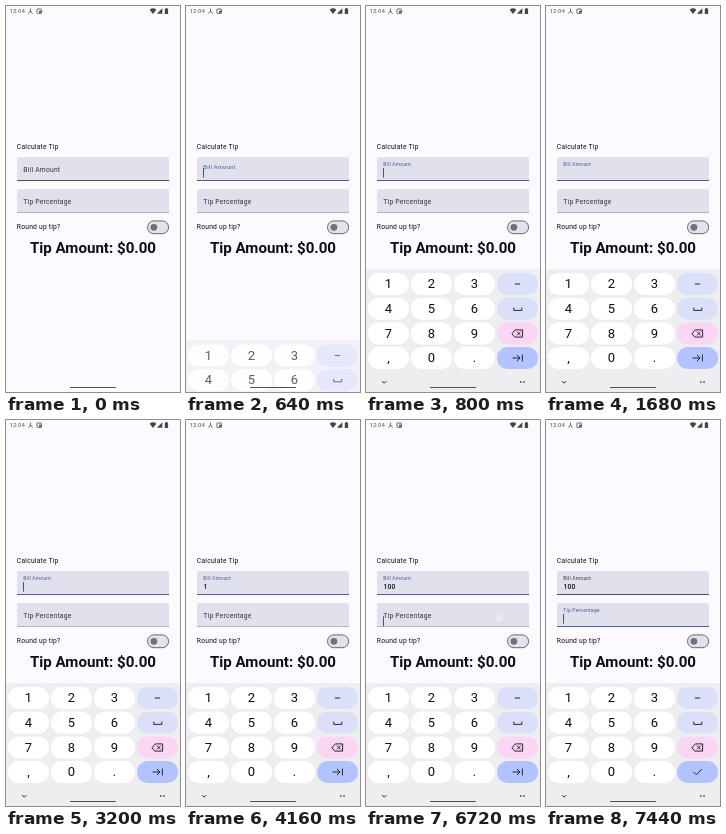
An HTML page for the animation above (8000 ms loop, 174 by 386 pixels).

```html
<!DOCTYPE html>
<html lang="en">
<head>
<meta charset="utf-8">
<title>Tip calculator</title>
<style>
  html, body { margin: 0; width: 100%; height: 100%; overflow: hidden; background: #fcf9ff; }
  svg { display: block; width: 100vw; height: 100vh; font-family: Roboto, Arial, sans-serif; fill: #0e0e13; }
  .body { font-size: 6.76px; letter-spacing: .21px; }
  .digit { font-size: 13px; text-anchor: middle; }
  .line { fill: none; stroke: #1d1e26; stroke-width: .95; stroke-linecap: round; stroke-linejoin: round; }
</style>
</head>
<body>
<svg id="stage" viewBox="0 0 174 386">
  <rect width="174" height="386" fill="#fcf9ff"/>

  <g id="status" fill="#45454b">
    <text x="3.4" y="7.2" font-size="6" letter-spacing=".12" fill="#55555b">12:04</text>
    <path d="M24.5 2.5v3M24.5 5l-2 2.6M24.5 5l2 2.6" fill="none" stroke="#45454b" stroke-width=".8"/>
    <rect x="30.9" y="3" width="4.6" height="4.4" rx=".6" fill="none" stroke="#45454b" stroke-width=".8"/>
    <rect x="33" y="4.8" width="2" height="1.8"/>
    <path d="M143.6 3.7Q147 .9 150.4 3.7L147 8Z"/>
    <path d="M156.3 2.3V7.8H150.8Z"/>
    <path d="M158.8 2.8h.9v-.7h1.5v.7h.9V8h-3.3Z"/>
  </g>

  <text class="body" x="10.8" y="143">Calculate Tip</text>
  <g id="fields"></g>
  <text class="body" x="10.8" y="222.7">Round up tip?</text>
  <rect x="141.5" y="214.9" width="21.1" height="12.8" rx="6.4" fill="#e1e2ec" stroke="#666771" stroke-width="1"/>
  <circle cx="147.9" cy="221.3" r="3.4" fill="#70717b"/>
  <text x="87" y="247" font-size="15.1" font-weight="700" text-anchor="middle">Tip Amount: $0.00</text>

  <rect id="caret" width="1" height="9.6" fill="#43538c"/>
  <circle id="pointer" r="3.6" fill="#fff" fill-opacity=".35"/>

  <g id="keyboard">
    <rect y="263" width="174" height="124" fill="#eeeef1"/>
    <g id="keys"></g>
    <path class="line" d="M149.2 278h4.6"/>
    <path class="line" d="M147.8 302v2.4h8V302"/>
    <path class="line" d="M146.2 327.5l3-3.6h7.4v7.2h-7.4ZM151.2 325.9l3.2 3.2M154.4 325.9l-3.2 3.2"/>
    <path id="next" class="line" d="M147 352h6.8M151.2 349.2l2.8 2.8-2.8 2.8M156.4 349v6"/>
    <path id="done" class="line" d="M147.8 352.2l2.6 2.6 5.2-5.4"/>
    <path class="line" d="M16.4 375.4l1.8 1.8 1.8-1.8"/>
    <path d="M154 376h1.6M157.2 376h1.6" stroke="#45454b" stroke-width="1.4"/>
  </g>
  <rect x="64" y="380.9" width="46" height="1.1" rx=".5" fill="#505056"/>
</svg>

<script>
const LOOP = 8000, STEP = 80;
const BLUE = '#4d5c92', GREY = '#33343c';
const $ = id => document.getElementById(id);
const show = (el, on) => el.setAttribute('visibility', on ? 'visible' : 'hidden');
const mix = (a, b, p) => a + (b - a) * p;
const progress = (t, from, to) => Math.min(1, Math.max(0, (t - from) / (to - from)));

function add(parent, tag, attrs, text = '') {
  const el = document.createElementNS('http://www.w3.org/2000/svg', tag);
  for (const name in attrs) el.setAttribute(name, attrs[name]);
  el.textContent = text;
  parent.append(el);
  return el;
}

function makeField(top, name, restColor) {
  const g = add($('fields'), 'g', {});
  add(g, 'path', { d: `M11 ${top + 24}V${top + 1.7}q0-1.7 1.7-1.7H161.3q1.7 0 1.7 1.7V${top + 24}Z`, fill: '#e0e1ec' });
  return {
    top, restColor,
    line: add(g, 'rect', { x: 11, y: top + 23, width: 152, height: 1 }),
    label: add(g, 'text', { x: 17.3 }, name),
    value: add(g, 'text', { class: 'body', x: 17.5, y: top + 18.2, 'font-weight': 500 }),
  };
}

function drawField(field, focused, raised) {
  field.line.setAttribute('fill', focused ? BLUE : field.restColor);
  field.label.setAttribute('y', field.top + mix(14.6, 8.6, raised));
  field.label.setAttribute('font-size', mix(6.76, 5.07, raised));
  field.label.setAttribute('letter-spacing', mix(.21, .17, raised));
  field.label.setAttribute('fill', focused ? BLUE : GREY);
}

const bill = makeField(151, 'Bill Amount', '#4c4d57');
const tip = makeField(183, 'Tip Percentage', '#b0b1ba');

['123', '456', '789', ',0.'].forEach((row, r) => {
  const y = 278 + r * 24.7;
  const special = ['#dae0f8', '#dae0f8', '#fbd5f4', '#b2c3ff'][r];
  for (let c = 0; c < 4; c++) {
    const x = 2 + c * 43;
    add($('keys'), 'rect', { x, y: y - 11, width: 41, height: 22, rx: 10.5, fill: c < 3 ? '#fff' : special });
    if (c < 3) add($('keys'), 'text', { class: 'digit', x: x + 20.5, y: y + 4.3 }, row[c]);
  }
});

// The caret toggles at each of these times, starting from hidden.
const caretToggles = [480, 960, 1120, 1680, 2240, 2640, 3200, 4160, 4880, 5520, 6080, 7120, 7440];
const typedAt = [3600, 4640, 5120];

function drawCaret(t, typed) {
  const inTip = t >= 6720;
  const settled = inTip ? t >= 6800 : t >= 640;
  const top = inTip ? tip.top : bill.top;
  show($('caret'), caretToggles.filter(at => t >= at).length % 2);
  $('caret').setAttribute('x', 17 + (inTip ? 0 : typed * 4.35));
  $('caret').setAttribute('y', top + (settled ? 11 : 13.4));
}

function drawPointer(t) {
  const early = t < 400;
  const p = progress(t, 0, 160);
  show($('pointer'), early || (t >= 6400 && t < 6800));
  $('pointer').setAttribute('cx', early ? mix(57, 35, p) : 133);
  $('pointer').setAttribute('cy', early ? mix(217, 168, p) : 198.2);
}

function drawKeyboard(t) {
  const p = progress(t, 560, 800);
  show($('keyboard'), t >= 640);
  $('keyboard').setAttribute('transform', `translate(0 ${124 * (1 - p) ** 1.36})`);
  $('keyboard').setAttribute('opacity', mix(.5, 1, p));
  show($('next'), t >= 640 && t < 6800);
  show($('done'), t >= 6800);
}

function draw(time) {
  const t = Math.floor((time % LOOP) / STEP) * STEP;
  const typed = typedAt.filter(at => t >= at).length;
  drawField(bill, t >= 640 && t < 6800, progress(t, 560, 720));
  drawField(tip, t >= 6800, progress(t, 6720, 6880));
  bill.value.textContent = '100'.slice(0, typed);
  drawCaret(t, typed);
  drawPointer(t);
  drawKeyboard(t);
}

const start = performance.now();
function tick() {
  draw(performance.now() - start);
  requestAnimationFrame(tick);
}
tick();
</script>
</body>
</html>
```
